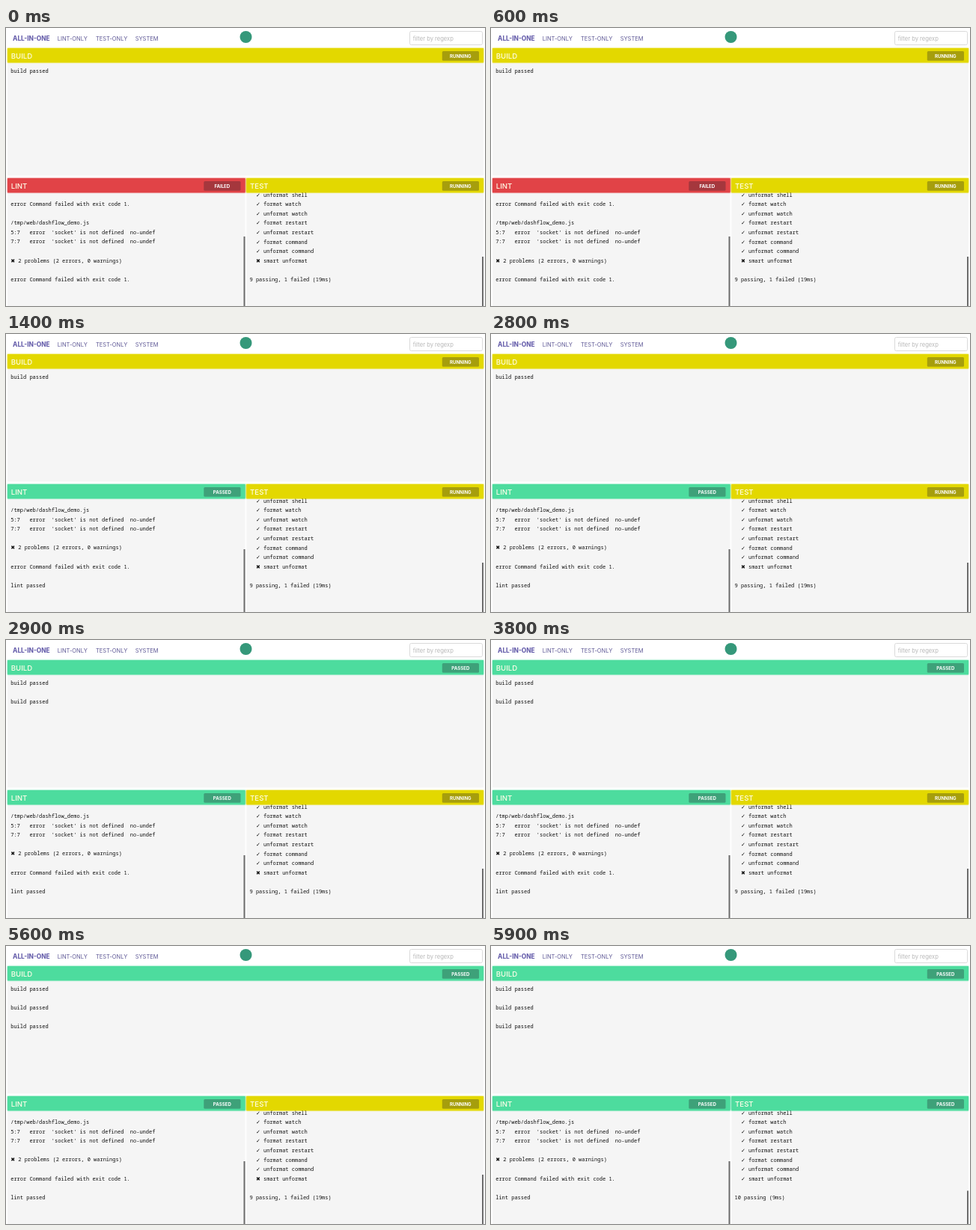
Write an HTML page with a canvas that moves like this. It is 640 px wide and 372 px high and loops after 6100 ms.

```html
<!DOCTYPE html>
<html lang="en">
<head>
<meta charset="utf-8">
<title>Task dashboard</title>
<style>
html, body { margin: 0; width: 100%; height: 100%; overflow: hidden; background: #fff; }
canvas { display: block; width: 640px; height: 372px; }
</style>
</head>
<body>
<canvas id="stage"></canvas>
<script>
const W = 640, H = 372, LOOP = 6100, LINE = 12.6;
const AT = { lintPassed: 1400, buildPassed: 2900, buildAgain: 4400, testPassed: 5900 };
const COLOR = { RUNNING: '#e3d800', FAILED: '#e14347', PASSED: '#4ddc9e' };
const MONO = '7px "Noto Sans Mono", monospace';
const MARK = '7px "DejaVu Sans", sans-serif';
const sans = (size, weight = 400) => `${weight} ${size}px Inter, sans-serif`;

const canvas = document.getElementById('stage');
const ctx = canvas.getContext('2d');
const ratio = window.devicePixelRatio || 1;
canvas.width = W * ratio;
canvas.height = H * ratio;
ctx.scale(ratio, ratio);

function text(str, x, y, font, color, align = 'left') {
  ctx.font = font;
  ctx.fillStyle = color;
  ctx.textAlign = align;
  ctx.fillText(str, x, y);
}

function rect(x, y, w, h, color) {
  ctx.fillStyle = color;
  ctx.fillRect(x, y, w, h);
}

function rounded(x, y, w, h, r) {
  ctx.beginPath();
  ctx.roundRect(x, y, w, h, r);
}

// The check and cross marks come from a wider, proportional font.
function logLine(line, x, y) {
  for (const part of line.split(/([✓✖])/)) {
    text(part, x, y, /[✓✖]/.test(part) ? MARK : MONO, '#111');
    x += ctx.measureText(part).width;
  }
}

function panel({ title, status, x, y, w, h, lines, firstLine, thumb }) {
  rect(x, y, w, h, '#f5f5f5');
  ctx.save();
  ctx.beginPath();
  ctx.rect(x, y, w, h);
  ctx.clip();
  lines.forEach((line, i) => logLine(line, x + 4.2, firstLine + i * LINE));
  ctx.restore();
  if (thumb) rect(x + w - 2, thumb, 2, H - thumb, '#6b6b6b');

  ctx.save();
  ctx.shadowColor = COLOR[status];
  ctx.shadowBlur = 2 * ratio;
  rect(x, y, w, 19.4, COLOR[status]);
  ctx.restore();
  text(title, x + 4.8, y + 13.9, sans(9.6, 500), '#fffde8');
  const badgeX = x + w - 55.2;
  ctx.fillStyle = 'rgba(30,30,40,.31)';
  rounded(badgeX, y + 4, 49.2, 12.7, 1.5);
  ctx.fill();
  text(status, badgeX + 24.5, y + 12.7, sans(6.1, 700), '#fff', 'center');
}

function toolbar() {
  text('ALL-IN-ONE', 9, 17.2, sans(8.3, 800), '#6a62ad');
  text('LINT-ONLY', 68.7, 17.2, sans(7.5), '#5f5996');
  text('TEST-ONLY', 120, 17.2, sans(7.5), '#5f5996');
  text('SYSTEM', 172.7, 17.2, sans(7.5), '#5f5996');

  ctx.fillStyle = '#35987a';
  ctx.beginPath();
  ctx.arc(320.5, 12, 8, 0, Math.PI * 2);
  ctx.fill();

  ctx.strokeStyle = '#dadada';
  ctx.lineWidth = 1;
  rounded(539.5, 4.5, 97, 18, 2);
  ctx.stroke();
  text('filter by regexp', 543.7, 16.5, sans(7.6), '#b8b8b8');
}

function buildLines(t) {
  const runs = 1 + (t >= AT.buildPassed) + (t >= AT.buildAgain);
  return Array(runs).fill(['build passed', '']).flat();
}

function lintLines(passed) {
  const failure = 'error Command failed with exit code 1.';
  const report = [
    '/tmp/web/dashflow_demo.js',
    "5:7   error  'socket' is not defined  no-undef",
    "7:7   error  'socket' is not defined  no-undef",
    '',
    '✖ 2 problems (2 errors, 0 warnings)',
    '',
    failure
  ];
  return passed ? [...report, '', 'lint passed'] : [failure, '', ...report];
}

function testLines(passed) {
  const checks = ['unformat shell'];
  for (const name of ['watch', 'restart', 'command']) {
    checks.push('format ' + name, 'unformat ' + name);
  }
  return [
    ...checks.map(name => '  ✓ ' + name),
    `  ${passed ? '✓' : '✖'} smart unformat`,
    '',
    passed ? '10 passing (9ms)' : '9 passing, 1 failed (19ms)'
  ];
}

function draw(t) {
  const lintOk = t >= AT.lintPassed;
  const testOk = t >= AT.testPassed;
  rect(0, 0, W, H, '#fff');
  toolbar();
  panel({
    title: 'BUILD', status: t >= AT.buildPassed ? 'PASSED' : 'RUNNING',
    x: 2, y: 27, w: 636, h: 170.5, lines: buildLines(t), firstLine: 60
  });
  panel({
    title: 'LINT', status: lintOk ? 'PASSED' : 'FAILED',
    x: 2, y: 201, w: 317.5, h: 171, lines: lintLines(lintOk),
    firstLine: 238, thumb: lintOk ? 288 : 279
  });
  panel({
    title: 'TEST', status: testOk ? 'PASSED' : 'RUNNING',
    x: 321.3, y: 201, w: 316.7, h: 171, lines: testLines(testOk),
    firstLine: 225.6, thumb: testOk ? 327.5 : 306
  });
}

const start = performance.now();
function frame() {
  draw((performance.now() - start) % LOOP);
  requestAnimationFrame(frame);
}
frame();
</script>
</body>
</html>
```
